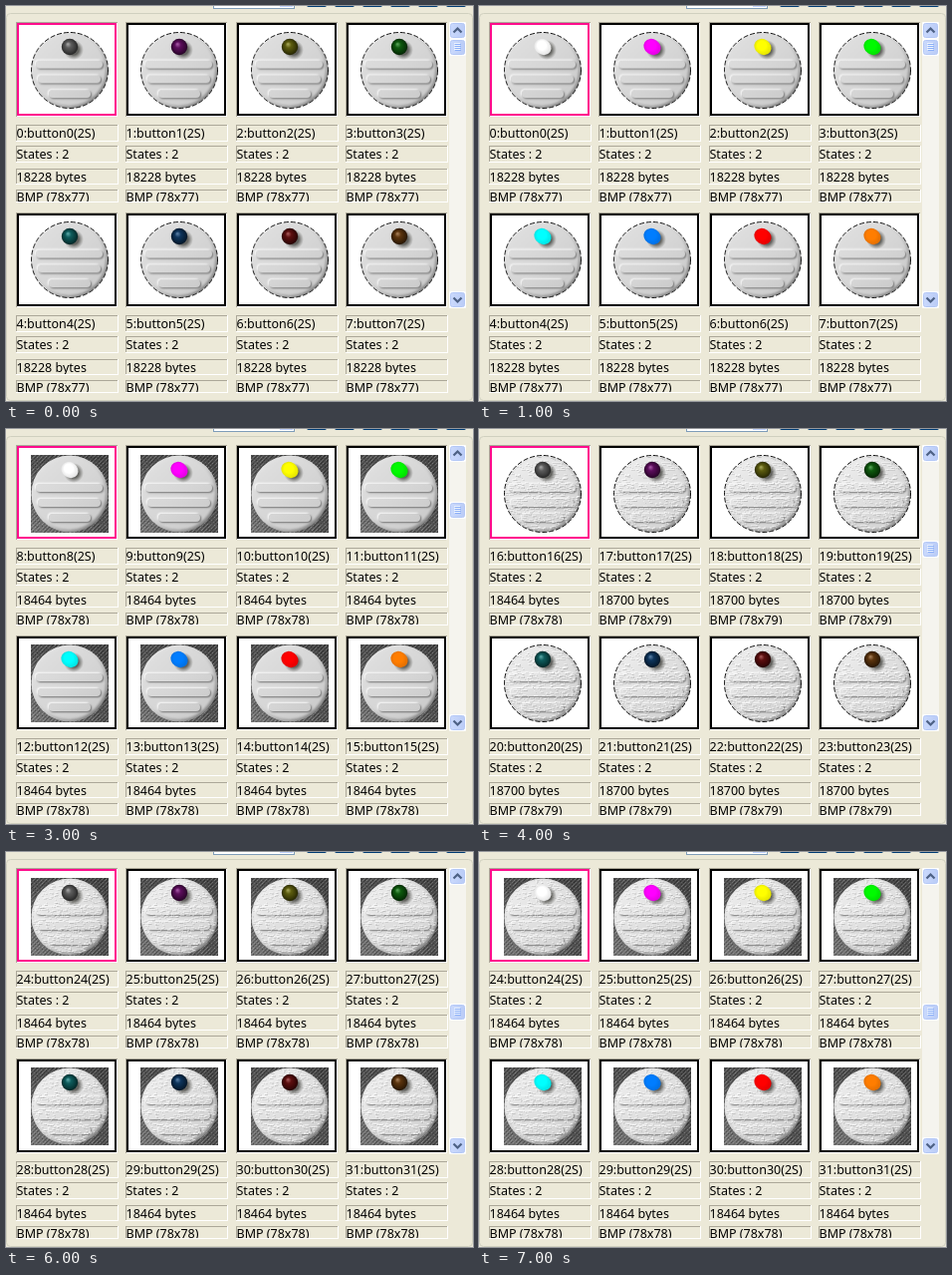
These frames come from a looping animation (469x396 px, 8 s). An HTML page with a canvas:

```html
<!DOCTYPE html>
<html>
<head>
<meta charset="utf-8">
<style>
html, body { margin: 0; width: 100%; height: 100%; overflow: hidden; background: #ece9d8; }
canvas { display: block; }
</style>
</head>
<body>
<canvas id="stage" width="469" height="396"></canvas>
<script>
const ctx = document.getElementById('stage').getContext('2d');
const LIGHTS = [[255, 255, 255], [255, 0, 255], [255, 255, 0], [0, 250, 0],
                [0, 255, 255], [0, 125, 255], [255, 0, 0], [255, 125, 0]];
const SIZE = 78;

function rect(c, color, x, y, w, h) {
  c.fillStyle = color;
  c.fillRect(x, y, w, h);
}

function box(c, fill, x, y, w, h, r, stroke) {
  c.beginPath();
  c.roundRect(x, y, w, h, r);
  if (fill) { c.fillStyle = fill; c.fill(); }
  if (stroke) { c.strokeStyle = stroke; c.lineWidth = 1; c.stroke(); }
}

function oval(c, fill, x, y, rx, ry = rx, turn = 0) {
  c.beginPath();
  c.ellipse(x, y, rx, ry, turn, 0, 7);
  c.fillStyle = fill;
  c.fill();
}

function gradient(fade, ...colors) {
  colors.forEach((color, i) => fade.addColorStop(i / (colors.length - 1), color));
  return fade;
}

function seeded(seed) {
  return () => (seed = (seed * 16807) % 2147483647) / 2147483647;
}

function weave(c, random) {
  rect(c, gradient(c.createLinearGradient(0, SIZE, SIZE, 0), '#777', '#515151', '#444'), 0, 0, SIZE, SIZE);
  for (let y = 0; y < SIZE; y++)
    for (let x = y % 2; x < SIZE; x += 2)
      rect(c, `rgba(${(x + y) % 4 ? '0,0,0' : '210,210,210'},${random() * 0.4})`, x, y, 1, 1);
}

function bar(c, x, y, w, face) {
  c.save();
  c.shadowBlur = 2;
  c.shadowColor = '#fff';
  c.shadowOffsetX = c.shadowOffsetY = -1;
  box(c, face, x, y, w, 8, 4);
  c.shadowColor = 'rgba(80,80,80,.75)';
  c.shadowOffsetX = c.shadowOffsetY = 1;
  box(c, face, x, y, w, 8, 4);
  c.restore();
}

function makeFace(rough, dark) {
  const canvas = document.createElement('canvas');
  canvas.width = canvas.height = SIZE;
  const c = canvas.getContext('2d'), random = seeded(71);
  if (dark) weave(c, random);

  // Beveled edge around a softly shaded face
  const diagonal = () => c.createLinearGradient(12, 12, 66, 66);
  oval(c, gradient(diagonal(), '#e8e8e8', '#cfcfcf', '#858585'), 39, 39, 38.5);
  const body = rough ? gradient(diagonal(), '#ececec', '#dfdfdf', '#d2d2d2')
                     : gradient(diagonal(), '#dedede', '#d6d6d6', '#cbcbcb');
  c.filter = 'blur(1px)';
  oval(c, body, 38.5, 38.5, 36.5);
  c.filter = 'none';
  if (!dark) {
    c.beginPath();
    c.arc(39, 39, 38.5, 0, 7);
    c.setLineDash([5, 2]);
    c.strokeStyle = '#111';
    c.stroke();
  }

  c.save();
  c.beginPath();
  c.arc(39, 39, 37.5, 0, 7);
  c.clip();
  bar(c, 5, 29, 67, body);
  bar(c, 7, 44, 63, body);
  bar(c, 18, 59, 42, body);
  if (rough) {
    for (let i = 0; i < 650; i++) {
      const x = random() * SIZE | 0, y = random() * SIZE | 0, w = 1 + random() * 4 | 0;
      rect(c, 'rgba(255,255,255,.4)', x, y, w, 1);
      rect(c, 'rgba(130,130,130,.2)', x + 1, y + 1, w, 1);
    }
  }
  c.restore();
  return canvas;
}

const faces = [[makeFace(0, 0), makeFace(0, 1)], [makeFace(1, 0), makeFace(1, 1)]];

function light(rgb, x, y, lit) {
  const tone = (k, base = 0) => `rgb(${rgb.map(v => base + v * k)})`;
  const shadow = ctx.createRadialGradient(x + 4, y + 3, 5, x + 4, y + 3, 10);
  oval(ctx, gradient(shadow, 'rgba(60,60,55,.75)', 'rgba(90,90,85,0)'), x + 4, y + 3, 10);
  const ball = ctx.createRadialGradient(x - 2, y - 3, 0, x, y, 9);
  if (lit) oval(ctx, gradient(ball, tone(1), tone(1), tone(0.88)), x, y, 9, 7.7, 0.6);
  else oval(ctx, gradient(ball, tone(0.3, 95), tone(0.3, 15), tone(0.22, 8), tone(0.1, 5)), x, y, 8.2);
}

function label(text, x, y, h, baseline) {
  rect(ctx, '#aca899', x, y, 102, 1);
  rect(ctx, '#aca899', x, y, 1, h);
  rect(ctx, '#fff', x, y + h - 1, 103, 1);
  rect(ctx, '#fff', x + 102, y, 1, h);
  ctx.save();
  ctx.beginPath();
  ctx.rect(x, y + 1, 102, h - 2);
  ctx.clip();
  ctx.fillStyle = '#000';
  ctx.font = '12.5px "Noto Sans", sans-serif';
  ctx.fillText(text, x + 0.5, baseline);
  ctx.restore();
}

function cell(slot, page, lit) {
  const x = Math.round(10 + 110.4 * (slot % 4)), row = slot >> 2, y = 16 + 191 * row;
  const id = page * 8 + slot;
  const height = page === 0 ? 77 : page === 2 && slot ? 79 : 78;

  rect(ctx, '#aca899', x, y, 102, 95);
  rect(ctx, '#fff', x + 1, y + 1, 101, 94);
  rect(ctx, slot ? '#000' : '#ff0c8c', x + 1, y + 1, 100, 93);
  rect(ctx, '#fff', x + 3, y + 3, 96, 89);
  ctx.drawImage(faces[page >> 1][page % 2], x + 15, 26 + 190 * row, SIZE, Math.min(height, SIZE));
  light(LIGHTS[slot], x + 54, 41 + 190 * row, lit);

  label(`${id}:button${id}(2S)`, x, y + 103, 17, y + 116);
  label('States : 2', x, y + 124, 17, y + 137);
  label(`${18228 + 236 * (height - 77)} bytes`, x, y + 147, 16, y + 160);
  label(`BMP (78x${height})`, x, y + 168, 13, y + 180);
}

function chevron(x, y, dir) {
  ctx.beginPath();
  ctx.moveTo(x - 4, y + 2 * dir);
  ctx.lineTo(x, y - 2 * dir);
  ctx.lineTo(x + 4, y + 2 * dir);
  ctx.strokeStyle = '#4d6185';
  ctx.lineWidth = 2.2;
  ctx.stroke();
}

function scrollPart(y) {
  box(ctx, '#fff', 445, y, 17, 17, 2);
  const fill = gradient(ctx.createLinearGradient(446, 0, 461, 0), '#cbdafd', '#b9cbf6');
  box(ctx, fill, 446.5, y + 1.5, 14, 14, 2, '#b4c8f6');
}

function scrollbar(page) {
  rect(ctx, '#f5f4ee', 445, 16, 17, 287);
  scrollPart(16);
  scrollPart(286);
  chevron(453.5, 24.5, 1);
  chevron(453.5, 294.5, -1);
  const y = Math.round(33 + 39.7 * page);
  scrollPart(y);
  for (let i = 0; i < 4; i++) {
    rect(ctx, '#eef4fe', 450, y + 4 + i * 2, 6, 1);
    rect(ctx, '#8cb0f8', 451, y + 5 + i * 2, 6, 1);
  }
}

function draw(step) {
  const page = step >> 1, lit = step % 2;
  rect(ctx, '#ece9d8', 0, 0, 469, 396);
  rect(ctx, '#7f9db9', 208, 0, 82, 3);
  rect(ctx, '#fff', 209, 0, 80, 2);
  rect(ctx, '#c1d2fb', 275, 0, 13, 1);
  for (let i = 0; i < 6; i++) box(ctx, '#003c74', 302 + 28 * i, -3, 20, 4, 2);
  box(ctx, null, 0.5, 7.5, 468, 388, 4, '#d0d0bf');
  for (let slot = 0; slot < 8; slot++) cell(slot, page, lit);
  scrollbar(page);
}

let shown = -1;
function tick() {
  const step = Math.floor(performance.now() % 8000 / 1000);
  if (step !== shown) draw(shown = step);
  requestAnimationFrame(tick);
}
tick();
</script>
</body>
</html>
```
